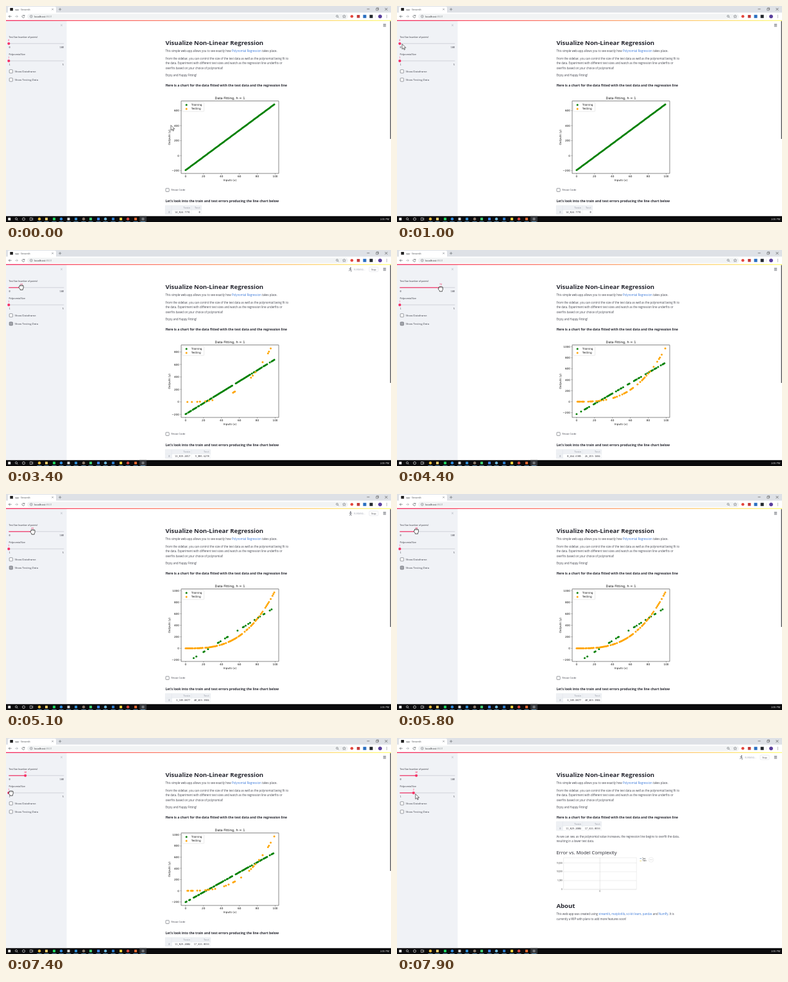
Write an HTML page that moves like this. It is 600 px wide and 338 px high and loops after 8 s.

```html
<!DOCTYPE html>
<html lang="en">
<head>
<meta charset="utf-8">
<title>Visualize Non-Linear Regression</title>
<style>
  html, body { margin: 0; width: 100%; height: 100%; overflow: hidden; background: #fff; }
  svg { display: block; width: 600px; height: 338px; font-family: "Open Sans", "Noto Sans", sans-serif; }
  text { white-space: pre; }
  .mono { font-family: "Noto Sans Mono", "DejaVu Sans Mono", monospace; }
  .plot { font-family: "DejaVu Sans", sans-serif; }
  .b { font-weight: 700; }
  .link { fill: #3a78d8; }
  .e { text-anchor: end; }
  .m { text-anchor: middle; }
</style>
</head>
<body>
<svg id="stage" viewBox="0 0 600 338" xmlns="http://www.w3.org/2000/svg"></svg>
<script>
const LOOP = 8000, STEP = 100;
const INK = '#262730', BODY = '#41434d', PINK = '#f63366';

const text = (x, y, s, size = 4.36, fill = BODY, cls = '', more = '') =>
  `<text x="${x}" y="${y}" font-size="${size}" fill="${fill}" class="${cls}" ${more}>${s}</text>`;
const rect = (x, y, w, h, fill, more = '') =>
  `<rect x="${x}" y="${y}" width="${w}" height="${h}" fill="${fill}" ${more}/>`;
const dot = (x, y, r, fill, more = '') =>
  `<circle cx="${x}" cy="${y}" r="${r}" fill="${fill}" ${more}/>`;
const line = (d, stroke, w = .6, more = '') =>
  `<path d="${d}" fill="none" stroke="${stroke}" stroke-width="${w}" ${more}/>`;
const link = s => `<tspan class="link">${s}</tspan>`;
const group = (id, body) => `<g id="${id}">${body}</g>`;
const $ = id => document.getElementById(id);
const show = (id, on) => $(id).setAttribute('visibility', on ? 'visible' : 'hidden');

// ---------- browser window ----------
function browser() {
  return rect(0, 0, 600, 10.6, '#dee1e6') +
    rect(3, 1, 75, 11, '#fff', 'rx="2"') + rect(0, 10.6, 600, 11.6, '#fff') +
    rect(6.3, 3, 4.6, 4.4, '#222') +
    text(14, 6.6, 'app · Streamlit', 3.5, '#45494d') +
    line('M71.3 3.9l2.6 2.6m0-2.6l-2.6 2.6', '#5f6368', .5) +
    line('M82 5.2h4.4M84.2 3v4.4', '#5f6368', .6) +
    line('M562.5 4.8h4M590.5 3l4 4m0-4l-4 4', '#222', .5) +
    line('M576.8 3.8h3v3h-3zM577.6 3.8v-.9h3v3h-.8', '#222', .4) +
    rect(33, 12.2, 500, 8.4, '#f1f3f4', 'rx="4.2"') +
    line('M8.6 16.3h-4.4m2-2l-2 2l2 2', '#5f6368', .7) +
    line('M14 16.3h4.4m-2-2l2 2l-2 2', '#a8abb0', .7) +
    line('M28.4 15a2 2 0 1 0 .5 1.9M28.9 13.8v1.7h-1.7', '#5f6368', .7) +
    dot(39.3, 16.3, 1.9, 'none', 'stroke="#5f6368" stroke-width=".5"') +
    line('M39.3 15.9v1.4M39.3 15v.4', '#5f6368', .5) +
    text(44, 17.9, 'localhost<tspan fill="#8a8e93">:8501</tspan>', 4.15, '#2b2d30') +
    dot(516, 15.9, 1.5, 'none', 'stroke="#5f6368" stroke-width=".6"') +
    line('M517.2 17.1l1.4 1.4', '#5f6368', .7) +
    line('M527 13.8l.7 1.7l1.8.1l-1.4 1.2l.5 1.8l-1.6-1l-1.6 1l.5-1.8l-1.4-1.2l1.8-.1z', '#5f6368', .5) +
    dot(539, 16.3, 2.3, '#e5483f') + rect(546.8, 14, 4.6, 4.6, '#c23b3b') +
    rect(556.5, 13.8, 5, 5, '#2a6fc0') + rect(566.6, 13.8, 5, 5, '#23282d') +
    line('M575.5 14v4.6', '#c8cacd', .4) +
    dot(583, 16.3, 2.9, '#5a3f9c') +
    [14.5, 16.3, 18.1].map(y => dot(593.4, y, .5, '#5f6368')).join('');
}

function taskbar() {
  const icons = [
    [52, '#e8b93a'], [63, '#f3cf6b'], [75, '#1ed760'], [86, '#2c8ce0'], [97.5, '#d4d7da'],
    [109, '#2f8fd8'], [121, '#8a7a6c'], [132, '#3ecf73'], [144, '#3f86f0'], [155, '#6fb8dc'],
    [167, '#2f80d0'], [179, '#f2d33c'], [190, '#d8453c'], [202, '#ee6b2f'], [213.5, '#77797c']
  ];
  return rect(0, 328.8, 600, 9.2, '#0b0b0d') +
    rect(208, 328.8, 11, 9.2, '#303236') +
    rect(3.2, 331.4, 4, 4, '#f5f5f5') +
    dot(16, 333, 1.6, 'none', 'stroke="#eee" stroke-width=".6"') +
    line('M17.1 334.2l1.4 1.4', '#eee', .6) +
    dot(27.5, 333.4, 2, 'none', 'stroke="#eee" stroke-width=".7"') +
    line('M37.4 331.4h3v4h-3zM41.8 331.4v4', '#eee', .6) +
    icons.map(([x, c], i) => (i % 3 ? rect(x - 2, 331.3, 4, 4, c) : dot(x, 333.3, 2.2, c)) +
      rect(x - 3.6, 337.3, 7.2, .7, '#76b9ed')).join('') +
    text(597, 334.9, '2:06 PM', 3.7, '#f2f2f2', 'e');
}

// ---------- sidebar ----------
const slider = (id, y, lo, hi) =>
  rect(4.3, y - .5, 86, 1, '#cfd2d9') +
  `<rect id="${id}Fill" x="4.3" y="${y - .6}" height="1.2" fill="${PINK}"/>` +
  `<circle id="${id}Thumb" cy="${y}" r="2.1" fill="${PINK}"/>` +
  `<text id="${id}Val" y="${y - 4}" font-size="3.4" fill="${PINK}" class="mono m"></text>` +
  text(4.6, y + 7, lo, 3.6, BODY, 'mono') + text(90, y + 7, hi, 3.6, BODY, 'mono e');

const check = (x, y, label, id = '') =>
  `<rect ${id && `id="${id}"`} x="${x}" y="${y - 2.6}" width="5.2" height="5.2" rx=".8" fill="#fff" stroke="#5a5d66" stroke-width=".6"/>` +
  text(x + 8.2, y + 1.5, label, 4.3);

function sidebar() {
  return rect(0, 22, 94.5, 306.8, '#f0f2f6') +
    line('M85.2 28.8l2.6 2.6m0-2.6l-2.6 2.6', '#a3a8b4', .6) +
    text(4.5, 49.8, 'Test Size (number of points)', 3.46, INK) + slider('size', 58.8, 0, 100) +
    text(4.5, 77.2, 'Polynomial Size', 3.5, INK) + slider('poly', 85.9, 1, 5) +
    check(5.2, 102.3, 'Show Dataframe') + check(5.2, 115.4, 'Show Testing Data', 'testBox');
}

// ---------- page ----------
function page() {
  const X = 248.4;
  return text(X, 60.6, 'Visualize Non-Linear Regression', 9.6, INK, 'b') +
    text(X, 72.4, `This simple web-app allows you to see exactly how ${link('Polynomial Regression')} takes place.`) +
    text(X, 84, 'From the sidebar, you can control the size of the test data as well as the polynomial being fit to') +
    text(X, 91.2, 'the data. Experiment with different test sizes and watch as the regression line underfits or') +
    text(X, 98.5, 'overfits based on your choice of polynomial!') +
    text(X, 109.7, 'Enjoy and Happy Fitting!') +
    text(X, 126.2, 'Here is a chart for the data fitted with the test data and the regression line', 5.08, INK, 'b') +
    group('fitView', group('plot', '') + check(249, 287.9, 'Show Code') +
      text(X, 307.2, 'Let’s look into the train and test errors producing the line chart below', 5.08, INK, 'b') +
      rect(598.6, 23.4, 1.4, 184.6, '#5c5c60')) +
    group('table', '') + group('errView', errorChart(X));
}

function errorChart(X) {
  const grid = [['15,000', 195.5], ['10,000', 209.3], ['5,000', 223.1], ['0', 236.9]];
  return text(X, 155.5, 'As we can see, as the polynomial value increases, the regression line begins to overfit the data,') +
    text(X, 162.8, 'resulting in a lower test data.') +
    text(X, 182, 'Error vs. Model Complexity', 7.52, INK) +
    line('M259.6 187.3h113.6v49.6h-113.6z', '#ddd', .5) +
    grid.map(([s, y]) => line(`M258.6 ${y}h114.6`, '#d6d6d6', .4) + text(257.6, y + 1, s, 2.9, '#333', 'e')).join('') +
    line('M316.3 187.3v50.4', '#c4c4c4', .4) + text(316.3, 241.4, '0', 2.9, '#333', 'm') +
    line('M378.4 188.6h2.6', '#4c78a8', .6) + text(382.3, 189.6, 'Test', 2.8, '#222') +
    line('M378.4 192.3h2.6', '#e5c51e', .6) + text(382.3, 193.4, 'Train', 2.8, '#222') +
    dot(396, 190.6, 3.7, '#fff', 'stroke="#d5d5d5" stroke-width=".4"') +
    [394.5, 396, 397.5].map(x => dot(x, 190.6, .45, '#888')).join('') +
    text(X, 265.7, 'About', 9.6, INK, 'b') +
    text(X, 277.3, `This web-app was created using ${['streamlit', 'matplotlib', 'sci-kit learn', 'pandas'].map(link).join(', ')
      .replace(/, (?=[^,]*$)/, ', ')} and ${link('NumPy')}. It is`) +
    text(X, 284.6, 'currently a WIP with plans to add more features soon!');
}

function toolbar() {
  return rect(0, 22, 600, 1.4, 'url(#deco)') +
    [28.5, 30.2, 31.9].map(y => line(`M587.8 ${y}h4.4`, '#5a5d66', .8)).join('') +
    group('running', `<path id="runner" fill="none" stroke="#6b6e78" stroke-width=".8" stroke-linecap="round"/>` +
      dot(537, 27.9, .9, '#6b6e78') +
      text(542.3, 31.5, 'RUNNING...', 3.2, '#a3a8b4') +
      rect(566, 26.8, 14, 7, '#fff', 'rx="1" stroke="#d9dbe2" stroke-width=".5"') +
      text(573, 31.6, 'Stop', 3.5, BODY, 'm'));
}

const pointers =
  group('arrow', '<path d="M0 0v8l1.9-1.7l1.3 2.8l1.3-.6l-1.3-2.7h2.6z" fill="#fff" stroke="#111" stroke-width=".6"/>') +
  group('hand', '<path d="M-2.6 -2.6q.9-1.1 1.6 0q.6-1.4 1.6-.2q.8-1 1.5.2q1.3-.6 1.3.9v2.6q0 1.2-.9 2v1.4h-4.2v-1.2q-1.5-1.3-2-2.7q-.3-1.4 1.1-1.2z" fill="#fff" stroke="#111" stroke-width=".7"/>' +
    line('M-1 -2.6v1.5M.6 -2.7v1.5M2.1 -2.5v1.4', '#111', .45));

$('stage').innerHTML =
  `<defs><linearGradient id="deco"><stop stop-color="${PINK}"/><stop offset="1" stop-color="#fffd80"/></linearGradient></defs>` +
  rect(0, 0, 600, 338, '#fff') + browser() + sidebar() + page() + toolbar() + taskbar() + pointers;

// ---------- regression data: a cubic, split by a fixed shuffle ----------
const order = ('26 86 2 55 75 93 16 73 54 95 53 92 78 13 7 30 22 24 33 8 43 62 3 71 45 48 6 99 82 76 60 80 90 68 51 ' +
  '27 18 56 63 74 1 61 42 41 4 15 17 40 38 5 91 59 0 34 28 50 11 35 23 52 10 31 66 57 79 85 32 84 14 89 19 29 49 97 ' +
  '98 69 20 94 72 77 25 37 81 46 39 65 58 12 88 70 87 36 21 83 9 96 67 64 47 44').split(' ').map(Number);
const cubic = x => x ** 3 / 1000;

function fit(xs) {
  const mean = a => a.reduce((s, v) => s + v, 0) / a.length;
  const mx = mean(xs), my = mean(xs.map(cubic));
  const k = mean(xs.map(x => (x - mx) * (cubic(x) - my))) / mean(xs.map(x => (x - mx) ** 2));
  return x => my + k * (x - mx);
}

const BOX = { x: 273, y: 148.8, w: 152, h: 113.2 };

function scale(vals, from, len) {
  const lo = Math.min(...vals), hi = Math.max(...vals), pad = (hi - lo) * .05;
  const f = v => from + (v - lo + pad) / (hi - lo + 2 * pad) * len;
  f.ticks = step => {
    const out = [];
    for (let v = Math.ceil((lo - pad) / step) * step; v <= hi + pad; v += step) out.push(v);
    return out;
  };
  return f;
}

function drawPlot(n) {
  const test = order.slice(0, n), train = order.slice(n), model = fit(train);
  const points = [...train.map(x => [x, model(x), 'green']), ...test.map(x => [x, cubic(x), 'orange'])];
  const sx = scale(points.map(p => p[0]), BOX.x, BOX.w);
  const sy = scale(points.map(p => p[1]), BOX.y + BOX.h, -BOX.h);
  const bottom = BOX.y + BOX.h, mid = BOX.x + BOX.w / 2;
  $('plot').innerHTML = '<g class="plot">' +
    points.map(([x, y, c]) => dot(sx(x).toFixed(2), sy(y).toFixed(2), 1.5, c)).join('') +
    rect(BOX.x, BOX.y, BOX.w, BOX.h, 'none', 'stroke="#111" stroke-width=".5"') +
    sx.ticks(20).map(v => line(`M${sx(v)} ${bottom}v1.4`, '#111', .4) + text(sx(v), 268.3, v, 4.25, '#111', 'm')).join('') +
    sy.ticks(200).map(v => line(`M${BOX.x} ${sy(v)}h-1.4`, '#111', .4) +
      text(270, sy(v) + 1.6, String(v).replace('-', '−'), 4.25, '#111', 'e')).join('') +
    text(mid, 146.1, 'Data Fitting, h = 1', 5.1, '#111', 'm') +
    text(mid, 274.2, 'Inputs (x)', 4.25, '#111', 'm') +
    text(0, 0, 'Outputs (y)', 4.25, '#111', 'm', 'transform="translate(255.6 205.4) rotate(-90)"') +
    rect(274.8, 150.6, 33.8, 14.4, '#fff', 'fill-opacity=".8" stroke="#ccc" stroke-width=".4" rx=".8"') +
    dot(281.2, 154.8, 1.5, 'green') + text(288.8, 156, 'Training', 4.25, '#111') +
    dot(281.2, 160.9, 1.5, 'orange') + text(288.8, 162.2, 'Testing', 4.25, '#111') + '</g>';
}

function drawTable([train, test]) {
  const wide = test !== '0', right = wide ? 318.6 : 304.6, grey = '#8d919c';
  $('table').innerHTML =
    rect(248.4, 312.2, right - 248.4, 7, '#eef0f4') + rect(248.4, 319.2, 10, 6.8, '#eef0f4') +
    line(`M248.4 312.2H${right}V326H248.4zM248.4 319.2H${right}M258.4 312.2V326M289.2 312.2V326`, '#dfe2e8', .4) +
    text(287, 317, 'Train', 3.64, grey, 'mono e') + text(right - 2, 317, 'Test', 3.64, grey, 'mono e') +
    text(255.4, 324, '0', 3.64, grey, 'mono e') +
    text(287, 324, train, 3.64, INK, 'mono e') + text(right - 2, 324, test, 3.64, INK, 'mono e');
}

// ---------- timeline ----------
const path = [
  [0, 257, 186.5], [900, 9, 60], [1000, 8, 59.5], [1200, 8, 60], [1500, 8, 60], [2000, 18.8, 58],
  [2400, 16.5, 56.7], [3300, 22, 58], [4100, 62, 60], [4400, 68, 60.5], [4600, 70, 60.5],
  [5000, 43, 59], [5500, 30, 58], [6000, 30, 58], [6500, 4, 85.7], [7300, 4, 85.7],
  [7700, 28, 87], [7900, 28.8, 87.5], [8000, 28.8, 87.5]
];
const plots = [[0, 0], [1900, 17], [3600, 47], [4900, 76], [6300, 30]];
const tables = [
  [0, ['14,824.7791', '0']], [2000, ['13,839.2017', '9,085.6278']], [3700, ['8,464.6985', '26,259.1684']],
  [5100, ['3,189.8877', '40,469.3904']], [6400, ['11,829.2004', '17,633.8593']]
];
const busy = [[1700, 2700], [3200, 3900], [4600, 5300], [6100, 6800], [7500, 8000]];
const poses = [
  'M537 29v2.2l-1.3 2.4M537 31.2l1.3 2.4M535.2 30.2l1.8-.6l1.8.6',
  'M537 29l-.5 2.2l-2 1.2M536.5 31.2l1.6 1l-.3 1.6M535 29.4l2 .2l1.4 1.4',
  'M537 29l-.3 2.2l-.4 2.6M536.7 31.2l2 .6l.8 1.6M535 31l2-1.2l2-.8'
];

const latest = (list, t) => list.filter(([at]) => at <= t).pop()[1];
const within = (t, a, b) => t >= a && t < b;

function pointer(t) {
  const i = path.findIndex(p => p[0] > t), a = path[i - 1], b = path[i];
  const u = (t - a[0]) / (b[0] - a[0]), k = u * u * (3 - 2 * u);
  return [a[1] + (b[1] - a[1]) * k, a[2] + (b[2] - a[2]) * k];
}

function setSlider(id, value, x) {
  $(id + 'Fill').setAttribute('width', x - 4.3);
  $(id + 'Thumb').setAttribute('cx', x);
  $(id + 'Val').setAttribute('x', x);
  $(id + 'Val').textContent = value;
}

let shownPlot, shownTable;

function render(t) {
  const [x, y] = pointer(t);
  const hand = within(t, 1200, 7700);
  show('hand', hand);
  show('arrow', !hand);
  $(hand ? 'hand' : 'arrow').setAttribute('transform', `translate(${x.toFixed(2)} ${y.toFixed(2)})`);

  const size = t < 1500 ? 0 : t >= 5500 ? 30 : Math.max(0, Math.round((x - 4.3) / .86));
  setSlider('size', size, 4.3 + size * .86);
  const degree = t >= 7300 && x > 14 ? 2 : 1;
  setSlider('poly', degree, 4.3 + (degree - 1) * 21.5);
  $('testBox').setAttribute('fill', within(t, 1700, 6200) ? '#a3a5ab' : '#fff');

  const n = latest(plots, t), row = latest(tables, t);
  if (n !== shownPlot) drawPlot(shownPlot = n);
  if (row !== shownTable) drawTable(shownTable = row);

  const cleared = t >= 7700;
  show('fitView', !cleared);
  show('errView', cleared);
  $('table').setAttribute('transform', `translate(0 ${cleared ? -181.4 : 0})`);

  show('running', busy.some(([a, b]) => within(t, a, b)));
  $('runner').setAttribute('d', poses[t / STEP % poses.length]);
}

const start = performance.now();
function tick(now) {
  const t = Math.max(0, now - start) % LOOP;
  render(Math.floor(t / STEP) * STEP);
  requestAnimationFrame(tick);
}
render(0);
requestAnimationFrame(tick);
</script>
</body>
</html>
```
